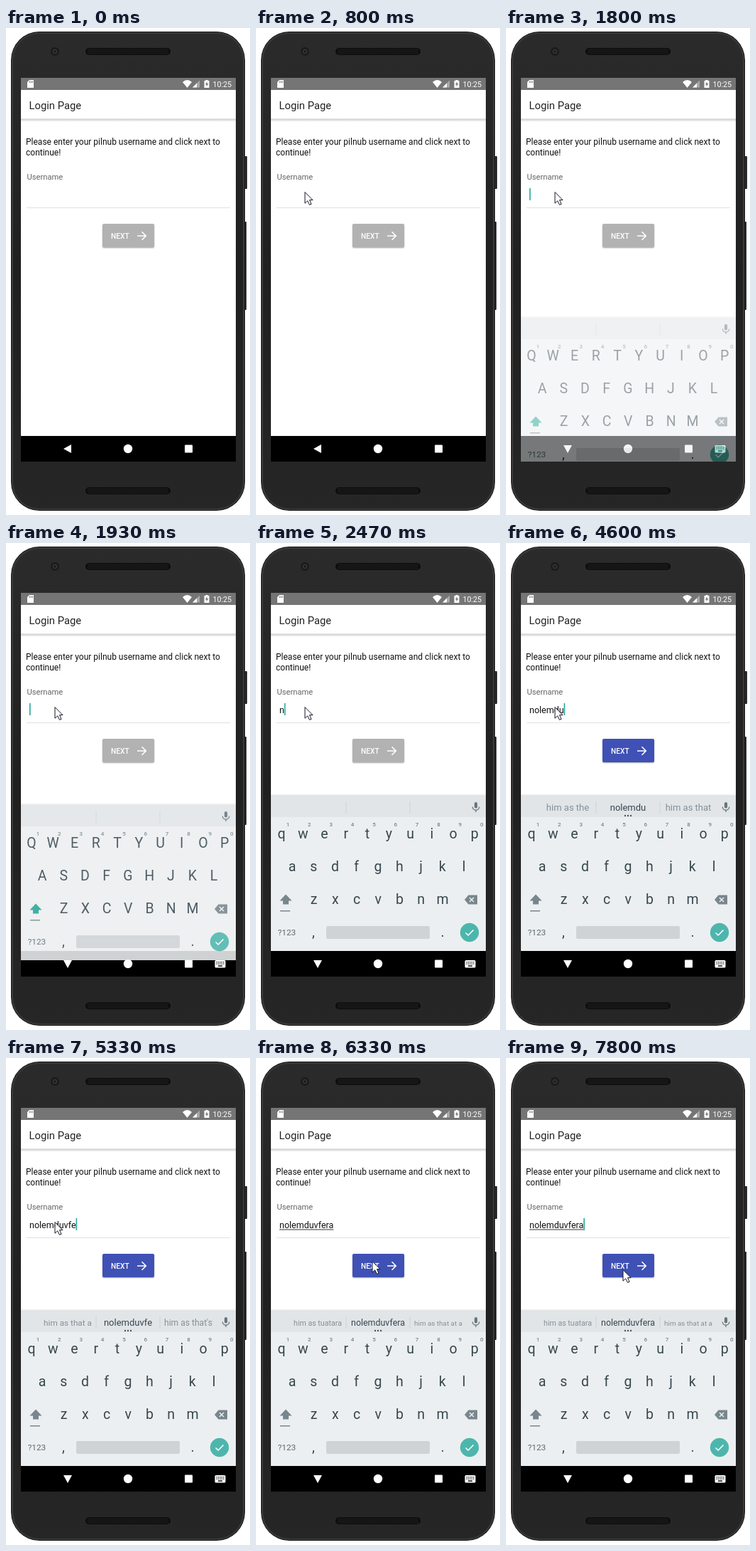
Animation, 344 px wide and 684 px high, one loop 8 s. Source, as an HTML page with a canvas:

```html
<!DOCTYPE html>
<html lang="en">
<meta charset="utf-8">
<title>Login Page</title>
<style>
html, body { margin: 0; width: 100%; height: 100%; overflow: hidden; background: #fff }
canvas { display: block }
</style>
<canvas id="stage" width="344" height="684"></canvas>
<script>
const W = 344, H = 684, LOOP = 8000;
const TEAL = '#26a69a', INK = '#37474f', MUTED = '#78868d';
const USER = 'nolemduvfera';
const KEY_TIMES = [2400, 2870, 3130, 3470, 3800, 4070, 4470, 4870, 5130, 5270, 5530, 5800];
const HINTS = [
  ['no', 'not'], ['no', 'not'], ['him', 'his'], ['him a', 'his'],
  ['him as', "Vuna's"], ['him as a', 'him as'], ['him as the', 'him as that'],
  ['him as that', 'him as the'], ['him as that', "him as that's"],
  ['him as that a', "him as that's"], ['him as tuatara', 'him as that at a'],
  ['him as tuatara', 'him as that at a']
];
// [time, x, y] of the mouse tip
const MOUSE = [[200, 146, 321], [470, 87, 226], [600, 75, 214], [800, 69, 230], [6000, 69, 230],
  [6330, 163, 284], [6470, 195, 308], [6600, 195, 308], [6670, 165, 297], [LOOP, 165, 297]];
// [time, offset, opacity] of the keyboard, held until the next entry
const SLIDE = [[1800, 52, .5], [1870, 28, .75], [1930, 13, .88], [2070, 2, .97], [2200, 0, 1]];

const screen = document.getElementById('stage').getContext('2d');
const makeLayer = () => Object.assign(document.createElement('canvas'), { width: W, height: H }).getContext('2d');
const phone = makeLayer(), keys = makeLayer();
let g = screen;

function box(x, y, w, h, fill, r = 0) {
  g.fillStyle = fill;
  g.beginPath();
  g.roundRect(x, y, w, h, r);
  g.fill();
}
function dot(x, y, r, fill) {
  g.fillStyle = fill;
  g.beginPath();
  g.arc(x, y, r, 0, 7);
  g.fill();
}
function shape(d, fill, x = 0, y = 0) {
  g.save();
  g.translate(x, y);
  g.fillStyle = fill;
  g.fill(new Path2D(d));
  g.restore();
}
function line(d, color, width) {
  g.strokeStyle = color;
  g.lineWidth = width;
  g.stroke(new Path2D(d));
}
function text(s, x, y, size, fill, align = 'left', weight = 400) {
  g.font = `${weight} ${size}px Roboto, sans-serif`;
  g.textAlign = align;
  g.fillStyle = fill;
  g.fillText(s, x, y);
}
function vertical(y0, y1, ...colors) {
  const grad = g.createLinearGradient(0, y0, 0, y1);
  colors.forEach((c, i) => grad.addColorStop(i / (colors.length - 1), c));
  return grad;
}

function speaker(y) {
  box(112, y, 120, 10, '#0d0d0d', 5);
  for (let i = 0; i < 57; i++)
    for (let j = 0; j < 4; j++) box(115 + i * 2 + j % 2, y + 1.5 + j * 2, 1, 1, '#303030');
}

function drawPhone() {
  g = phone;
  box(335, 180, 5, 46, '#2a2a2a', 1);
  box(335, 272, 4, 124, '#2a2a2a', 1);
  box(7, 5, 330, 673, '#151515', 40);
  box(8, 6, 328, 671, '#3a3a3a', 39);
  box(10, 8, 324, 667, vertical(8, 675, '#2b2b2b', '#202020', '#262626'), 37);
  speaker(28);
  speaker(645);
  dot(69, 33, 6, '#1a1a1a');
  dot(69, 33, 3.5, '#303238');
  dot(69, 33, 1.5, '#15171c');

  box(21, 70, 303, 539, '#fff');
  box(21, 70, 303, 17, '#757575');
  shape('M3 0H9V11H0V3Z', '#fff', 30, 73);
  for (const x of [33, 35, 37]) box(x, 74.5, 1, 2.5, '#757575');
  shape('M0 3Q6.5 -3 13 3L6.5 11Z', '#fff', 249, 73);
  shape('M10 0V10H0Z', '#a9a9a9', 263, 73.5);
  shape('M6 4V10H0Z', '#fff', 263, 73.5);
  shape('M2 1V0H5V1H7V11H0V1Z', '#fff', 279.5, 73);
  shape('M4 2L1.5 6.5H3.2V9.5L5.7 5H4Z', '#757575', 279.5, 73);
  text('10:25', 318, 83, 10.7, '#fff', 'right');

  text('Login Page', 32.5, 114, 14.8, '#222');
  box(21, 127.5, 303, 4, vertical(127, 132, '#c4c4c4', '#fff'));
  text('Please enter your pilnub username and click next to', 28, 163.5, 12, '#111');
  text('continue!', 28, 179, 12, '#111');
  text('Username', 29.5, 212.5, 11.2, '#666');
  box(29, 252, 287, 1, '#e0e0e0');
}

function drawNav(open) {
  box(21, 573, 303, 36, '#000');
  shape(open ? 'M81 586H93L87 597Z' : 'M92 585V597L81 591Z', '#fff');
  dot(172, 591, 6.2, '#fff');
  box(252, 585.5, 11, 11, '#fff', 1);
  if (!open) return;
  box(294.5, 586, 15, 10.5, '#fff', 1.5);
  for (let i = 0; i < 5; i++)
    for (const y of [588, 590.5]) box(296.5 + i * 2.4, y, 1.3, 1.3, '#000');
  box(299, 593.3, 6, 1.4, '#000');
}

// Shrinks a suggestion that is too wide for its column
function hint(s, x, room, fill) {
  g.font = '400 13px Roboto, sans-serif';
  text(s, x, 376, 13 * Math.min(1, room / g.measureText(s).width), fill, 'center');
}

function drawKeys(t, typed) {
  g = keys;
  g.clearRect(0, 0, W, H);
  box(21, 352, 303, 4, vertical(352, 356, '#0000', '#0002'));
  box(21, 356, 303, 217, '#eceff1');
  box(21, 356, 303, 29, '#e1e5e8');
  for (const x of [126.5, 216.5]) box(x, 363, 1, 17, '#cdd3d6');
  box(307.9, 364, 4.2, 8.5, '#68757c', 2.1);
  line('M305.3 370.5A4.7 4.7 0 0 0 314.7 370.5M310 375V378', '#68757c', 1.3);

  if (t >= 2530) {
    const [left, right] = HINTS[typed.length - 1];
    hint(left, 87, 68, '#849097');
    hint(typed, 172, 76, INK);
    hint(right, 257, 68, '#849097');
    for (const x of [168, 172, 176]) dot(x, 383, 1.2, '#455a64');
  }

  const upper = t < 2470;
  [['qwertyuiop', 36, 415], ['asdfghjkl', 51, 461], ['zxcvbnm', 81.5, 507]].forEach(([row, x, y]) =>
    [...row].forEach((c, i) => text(upper ? c.toUpperCase() : c, x + i * 30.25, y, 19.5, INK, 'center')));
  [...'1234567890'].forEach((c, i) => text(c, 45 + i * 30.35, 398, 8, MUTED, 'center', 500));

  shape('M8.5 0L17 9H12.5V14H4.5V9H0Z', upper ? TEAL : MUTED, 33.5, 493.5);
  box(34, 516, 14, 1.5, MUTED);
  shape('M5.5 0H18V13H5.5L0 6.5Z', MUTED, 294, 494.5);
  line('M301 498L307 504M307 498L301 504', '#eceff1', 1.5);
  text('?123', 43.5, 551, 11.8, '#5a6a72', 'center');
  text(',', 81, 553, 19.5, INK, 'center');
  box(99, 538, 146, 18, '#cfd3d6', 2);
  text('.', 263, 553, 19.5, INK, 'center');
  dot(301, 547, 13.2, '#4db6ac');
  line('M295.5 547.5L299.2 551L306.5 543.5', '#fff', 1.6);
  g = screen;
}

function drawButton(t) {
  const k = Math.min(1, Math.max(0, (t - 2530) / 200));
  const mix = (a, b) => Math.round(a + (b - a) * k);
  g.save();
  g.shadowColor = '#0005';
  g.shadowBlur = 2;
  g.shadowOffsetY = 1;
  box(136, 275, 73, 33, `rgb(${mix(178, 63)},${mix(178, 81)},${mix(178, 181)})`, 2);
  g.restore();
  text('NEXT', 148, 296, 10.2, '#fff', 'left', 500);
  line('M185 292H197M191.5 286.2L197.3 292L191.5 297.8', '#fff', 1.6);
}

function drawInput(t, typed) {
  text(typed, 33, 238.5, 12.5, '#111');
  const end = 33 + g.measureText(typed).width;
  if (t >= 5870) box(33, 240.5, end - 33, 1, '#333');
  const last = KEY_TIMES[typed.length - 1];
  const caret = typed ? (t - last) % 1000 < 470
    : t >= 1270 && t < 1470 || t >= 1530 && t < 2070;
  if (caret) box(end, 225, 1.6, 17, TEAL);
}

function drawMouse(t) {
  if (t < 200) return;
  const step = Math.max(200, Math.floor(t * .015 + .1) / .015);
  const i = Math.max(1, MOUSE.findIndex(p => p[0] >= step));
  const [t0, x0, y0] = MOUSE[i - 1], [t1, x1, y1] = MOUSE[i];
  const k = (step - t0) / (t1 - t0);
  g.save();
  g.translate(Math.round(x0 + (x1 - x0) * k), Math.round(y0 + (y1 - y0) * k));
  const arrow = 'M0 .5V16.2L3.7 12.8L6.5 18.4L9 17.3L6.5 11.6H11Z';
  shape(arrow, '#fff');
  line(arrow, '#151525', 1);
  g.restore();
}

function frame() {
  const t = performance.now() % LOOP;
  const typed = USER.slice(0, KEY_TIMES.filter(k => k <= t).length);
  g.clearRect(0, 0, W, H);
  g.drawImage(phone.canvas, 0, 0);
  drawInput(t, typed);
  drawButton(t);
  drawNav(t >= 1530);

  const slide = SLIDE.filter(s => s[0] <= t).pop();
  if (slide) {
    drawKeys(t, typed);
    g.save();
    g.beginPath();
    g.rect(21, 70, 303, 539);
    g.clip();
    g.globalAlpha = slide[2];
    g.drawImage(keys.canvas, 0, slide[1]);
    g.restore();
  }
  drawMouse(t);
  requestAnimationFrame(frame);
}

drawPhone();
g = screen;
frame();
</script>
</html>
```
